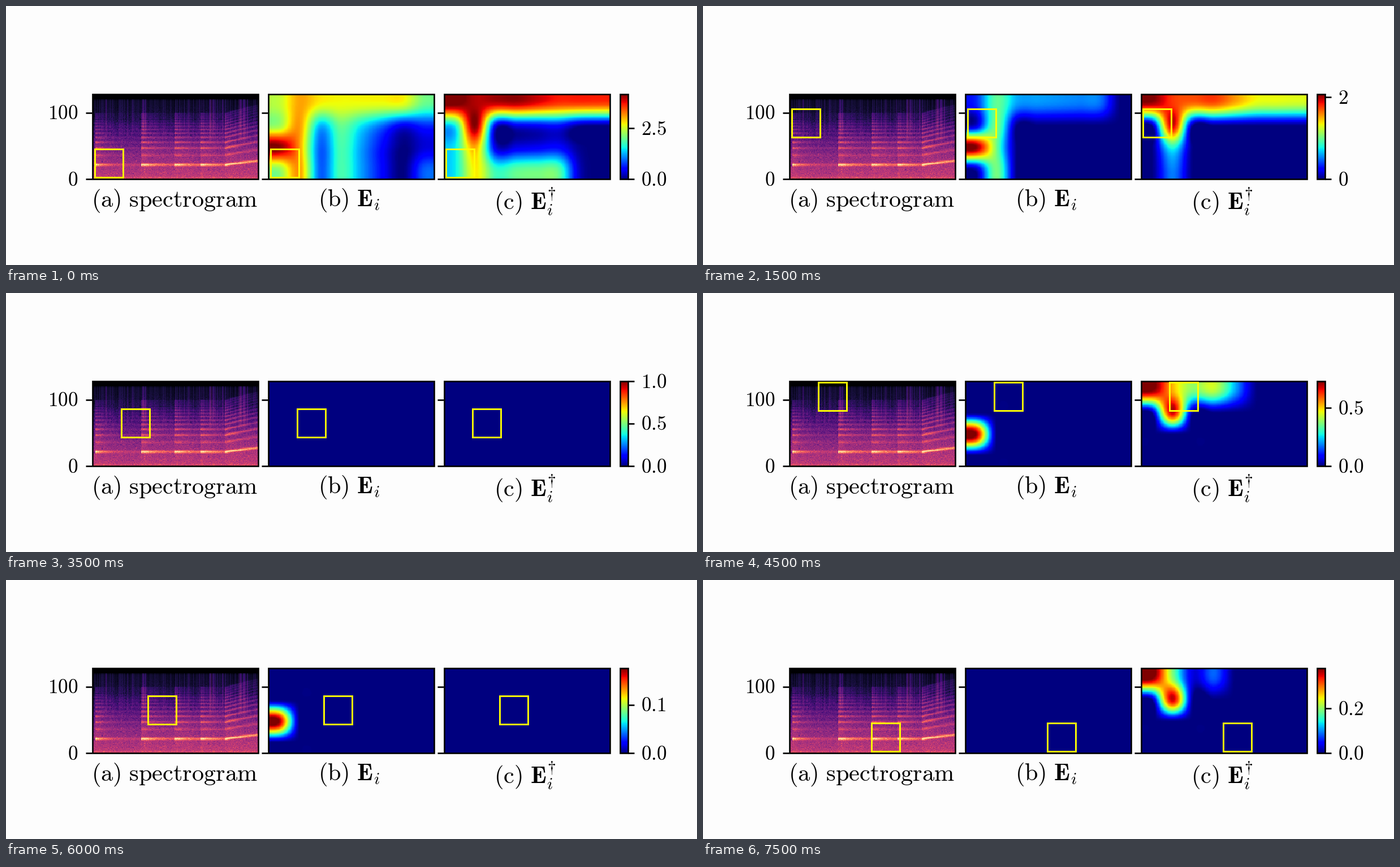
Recreate the animation shown at these times as a matplotlib script. Size 1222x458 px, loop 8 s.

```python
import numpy as np
import matplotlib.pyplot as plt
from matplotlib.animation import FuncAnimation
from matplotlib.patches import Rectangle
from matplotlib.ticker import MaxNLocator

plt.rcParams["mathtext.fontset"] = "cm"

W, H, DPI = 1222, 458, 100
TOP, BOTTOM = 156, 306
PANELS = [(153, 446), (464, 757), (774.5, 1068)]
BAR = (1086, 1100)
LINE = 1.9
STEPS, PATCH_ROWS = 16, 5
CAPTION, NUMBER = 30.5, 25.4

# Highest value of each map as (step, value) key points
PEAK_B = [(0, 4.17), (3, 2.07), (4, 1.3), (5, 0), (8, 0),
          (10, 1.46), (11, 1.2), (12, 0.176), (13, 0)]
PEAK_C = [(0, 4.17), (3, 1.95), (4, 1.25), (5, 0), (7, 0), (8, 0.07),
          (10, 1.35), (11, 1.1), (12, 0), (13, 0.25), (15, 0.38)]


def through(x, *points):
    return np.interp(x, *zip(*points))


def bump(d, width, power=2):
    return np.exp(-np.abs(d / width) ** power)


def cubic_weights(n, m):
    """Matrix that resamples n cells to m pixels with a cubic kernel."""
    pos = (np.arange(m) + 0.5) * n / m - 0.5
    base = np.floor(pos).astype(int)
    weights = np.zeros((m, n))
    for k in range(-1, 3):
        d = np.abs(pos - base - k)
        near = 1.5 * d**3 - 2.5 * d**2 + 1
        far = -0.5 * d**3 + 2.5 * d**2 - 4 * d + 2
        cell = np.clip(base + k, 0, n - 1)
        weights[np.arange(m), cell] += np.where(d <= 1, near, far)
    return weights


ROWS, COLS = cubic_weights(4, 128), cubic_weights(8, 250)
Y, X = np.mgrid[0:4, 0:8].astype(float)


def cells_b():
    top = through(X, (0, 1.6), (1, 2.25), (2, 1.85), (6, 1.75), (7, 1.15))
    low = through(X, (0, 1.4), (1, 2.3), (2, 0.1), (3, 1), (6, -0.95), (7, -0.5))
    mix = through(Y, (0, 1), (1, 0.2), (2, 0))
    peak = 1.95 * bump(np.hypot(X, Y - 2), 0.4)
    corner = 0.55 * bump(np.hypot(X - 7, Y - 3), 0.4)
    return mix * top + (1 - mix) * low + peak + corner


def cells_c():
    top = through(X, (0, 3.25), (2, 2.9), (3, 2.95), (5, 2.55), (7, 2.5))
    low = through(X, (0, 0.55), (2, -0.6), (5, -0.4), (7, -1.3))
    stem = 3.25 * np.maximum(Y, 1) ** -0.6 * bump(X - 1, 0.4)
    floor = 1.5 * bump(X - 3.5, 2.2, 6) * (Y == 3)
    return np.where(Y == 0, top, low + stem + floor)


def heat(cells, peak):
    """Lower the map to the given peak, cut it at zero and smooth it."""
    cut = np.maximum(cells - cells.max() + peak, 0)
    return np.maximum(ROWS @ cut @ COLS.T, 0)[::-1]


def spectrogram():
    rng = np.random.default_rng(4)
    f, t = np.mgrid[0:128, 0:250]
    spec = through(f, (0, 0.6), (4, 0.5), (20, 0.44), (45, 0.34), (70, 0.2),
                   (90, 0.08), (118, 0.05), (120, 0))
    spec += rng.normal(0, 0.045, spec.shape) * through(f, (0, 1), (70, 0.8), (95, 0.4), (119, 0))

    # vertical streaks in the upper range, denser around three places
    gain = (0.05 + 0.06 * bump(t - 188, 14, 6) + 0.13 * bump(t - 226, 5, 6)
            + 0.1 * bump(t - 77, 4, 6))
    streaks = np.abs(rng.normal(0, 1, 250)) * gain
    spec += streaks * through(f, (50, 0), (80, 1), (119, 1), (120, 0))

    # harmonics of five notes on a mel axis, the last one rising
    onsets = [4, 73, 124, 163, 200, 250]
    for start, end in zip(onsets, onsets[1:]):
        last = end == 250
        on = (t >= start) & (t < end)
        age = np.maximum(t - start, 0)
        rise = 1 + 0.0075 * age * last
        fade = 90 if last else 18 if start < 50 else 40
        for k in range(1, 14):
            centre = 45 * np.log(1 + 0.6 * k * rise)
            strength = 0.52 if k == 1 else 0.33 - 0.014 * k - 0.12 * (k == 2)
            decay = 0.15 + 0.85 * np.exp(-age * (1 + k / 8) / fade)
            spec += on * strength * decay * bump(f - centre, 1.9 if k < 4 else 1.5)
        spec += on * np.exp(-age / fade) * through(f, (0, 0.03), (45, 0.08), (95, 0))
    return np.clip(spec, 0, 1)


fig = plt.figure(figsize=(W / DPI, H / DPI), dpi=DPI, facecolor="#fdfdfd")
ax = fig.add_axes([0, 0, 1, 1])
ax.axis("off")


def image(data, span, cmap):
    return ax.imshow(data, cmap=cmap, vmin=0, vmax=1, origin="lower", aspect="auto",
                     interpolation="nearest", extent=(*span, BOTTOM, TOP))


def outline(x, y, w, h, color, lw):
    return ax.add_patch(Rectangle((x, y), w, h, fill=False, ec=color, lw=lw,
                                  joinstyle="miter"))


def label(x, y, text, size, ha="left"):
    return ax.text(x, y, f"${text}$", fontsize=size, ha=ha, va="baseline")


def tick(x, y):
    return ax.plot([x, x + 11], [y, y], color="black", lw=LINE, solid_capstyle="butt")[0]


image(spectrogram(), PANELS[0], "magma")
cells = [cells_b(), cells_c()]
maps = [image(np.zeros((128, 250)), span, "jet") for span in PANELS[1:]]
image(np.linspace(0, 1, 256)[:, None], BAR, "jet")

boxes = []
for left, right in PANELS:
    for value in (0, 100):
        tick(left - 12, BOTTOM - value * 150 / 128)
    outline(left, TOP, right - left, BOTTOM - TOP, "black", LINE)
    boxes.append(outline(left, TOP, 50, 50, "yellow", 2.1))
outline(BAR[0], TOP, BAR[1] - BAR[0], BOTTOM - TOP, "black", LINE)

label(127, 200, r"\mathrm{100}", NUMBER, "right")
label(127, 317.5, r"\mathrm{0}", NUMBER, "right")
label(151, 354.5, r"\mathrm{(a)}\ \mathrm{spectrogram}", CAPTION)
label(552, 354, r"\mathrm{(b)}\ \mathbf{E}_i", CAPTION)
label(863, 361, r"\mathrm{(c)}\ \mathbf{E}_i^{\!\dagger}", CAPTION)

bar_ticks = [tick(BAR[1], BOTTOM) for _ in range(3)]
bar_labels = [label(1123, BOTTOM, "0", NUMBER) for _ in range(3)]
locator = MaxNLocator(2, steps=[1, 2, 2.5, 5, 10])
ax.set_xlim(0, W)
ax.set_ylim(H, 0)


def update(step):
    peaks = [through(step, *keys) for keys in (PEAK_B, PEAK_C)]
    top = max(peaks) or 1
    for im, grid, peak in zip(maps, cells, peaks):
        im.set_data(heat(grid, peak))
        im.set_clim(0, top)

    col, row = divmod(step, PATCH_ROWS)
    for box, (left, _) in zip(boxes, PANELS):
        box.set_xy((left + 3.7 + 47.2 * col, 253 - 23.8 * row))

    gap = locator.tick_values(0, top)[1]
    digits = len(f"{gap:g}".partition(".")[2])
    for i, (mark, text) in enumerate(zip(bar_ticks, bar_labels)):
        value = i * gap
        y = BOTTOM - (BOTTOM - TOP) * value / top
        mark.set_ydata([y, y])
        text.set_y(y + 11.5)
        text.set_text(rf"$\mathrm{{{value:.{digits}f}}}$")
        for part in (mark, text):
            part.set_visible(value <= top)
    return maps + boxes + bar_ticks + bar_labels


anim = FuncAnimation(fig, update, frames=STEPS, interval=500,
                     repeat=True, repeat_delay=0, blit=False)
plt.show()
```
